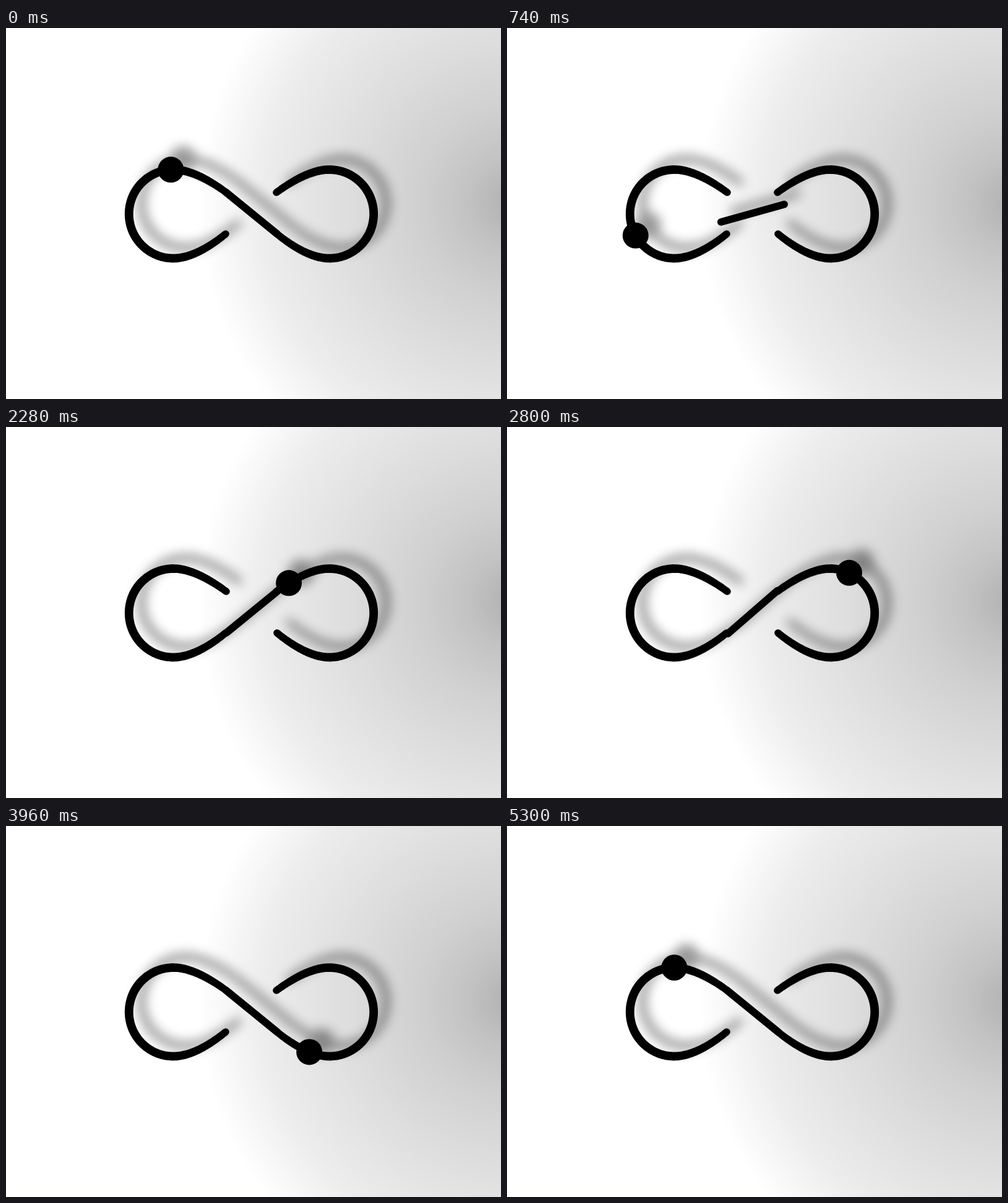
An HTML page for the animation above (5.32 s loop, 800 px wide and 600 px high).

```html
<!DOCTYPE html>
<html lang="en">
<head>
<meta charset="utf-8">
<title>Infinity switch</title>
<style>
  html, body { margin: 0; width: 100%; height: 100%; overflow: hidden; background: #fff; }
  svg { display: block; width: 100%; height: 100%; }
</style>
</head>
<body>
<svg viewBox="0 0 800 600">
  <defs>
    <radialGradient id="shade" gradientUnits="userSpaceOnUse" cx="820" cy="283" r="510">
      <stop offset="0" stop-color="#b0b0b0"/>
      <stop offset=".15" stop-color="#c3c3c3"/>
      <stop offset=".3" stop-color="#d0d0d0"/>
      <stop offset=".5" stop-color="#dcdcdc"/>
      <stop offset=".8" stop-color="#ededed"/>
      <stop offset="1" stop-color="#fff"/>
    </radialGradient>
    <filter id="shadow" filterUnits="userSpaceOnUse" x="0" y="0" width="800" height="600" color-interpolation-filters="sRGB">
      <feDropShadow dx="20" dy="-17" stdDeviation="9" flood-color="#000" flood-opacity=".4"/>
    </filter>
  </defs>
  <rect width="800" height="600" fill="url(#shade)"/>
  <g id="figure" filter="url(#shadow)">
    <line id="bar" x1="-53" x2="53" stroke="#000" stroke-width="12" stroke-linecap="round"/>
    <circle id="dot" r="21"/>
  </g>
</svg>
<script>
const LOOP = 5320, PHASE = 20, TURN = 1150, TILT = 39.2;
const figure = document.getElementById('figure');
const bar = document.getElementById('bar');
const dot = document.getElementById('dot');

function make(tag, attrs) {
  const el = document.createElementNS('http://www.w3.org/2000/svg', tag);
  for (const key in attrs) el.setAttribute(key, attrs[key]);
  return el;
}

const leftLoop = 'M356 266C330 247 298.5 229 270.5 229A71.75 71.75 0 0 0 270.5 372.5C298.5 372.5 330 353.5 355 333';
const rightLoop = 'M437 266C463 247 494.5 229 522.5 229A71.75 71.75 0 0 1 522.5 372.5C494.5 372.5 463 353.5 438 333';

const track = make('path', {
  d: 'M270.5 229A71.75 71.75 0 0 0 270.5 372.5C298.5 372.5 330 353.5 355 333L437 266' +
     rightLoop.slice(rightLoop.indexOf('C')) +
     'L356 266C330 247 298.5 229 270.5 229'
});
const trackLength = track.getTotalLength();

// A stroke that gets slightly thinner towards both ends.
function drawRibbon(d) {
  const line = make('path', { d });
  const length = line.getTotalLength(), steps = 160;
  const outer = [], inner = [];
  for (let i = 0; i <= steps; i++) {
    const s = length * i / steps;
    const p = line.getPointAtLength(s);
    const a = line.getPointAtLength(Math.max(0, s - 0.5));
    const b = line.getPointAtLength(Math.min(length, s + 0.5));
    const angle = Math.atan2(b.y - a.y, b.x - a.x);
    const half = 5.8 + 1.1 * Math.min(1, s / 95, (length - s) / 95);
    const nx = -Math.sin(angle) * half, ny = Math.cos(angle) * half;
    outer.push(`${p.x + nx} ${p.y + ny}`);
    inner.unshift(`${p.x - nx} ${p.y - ny}`);
    if (i % steps === 0) figure.insertBefore(make('circle', { cx: p.x, cy: p.y, r: half }), bar);
  }
  figure.insertBefore(make('path', { d: `M${outer.concat(inner).join('L')}Z` }), bar);
}

// Cubic Bezier timing with flat ends.
function ease(x) {
  if (x <= 0) return 0;
  if (x >= 1) return 1;
  let lo = 0, hi = 1, u = 0.5;
  for (let i = 0; i < 24; i++) {
    u = (lo + hi) / 2;
    const v = 1 - u;
    if (3 * v * v * u * 0.63 + 3 * v * u * u * 0.555 + u * u * u < x) lo = u;
    else hi = u;
  }
  return u * u * (3 - 2 * u);
}

function render(time) {
  const t = (time + PHASE) % LOOP;
  const p = track.getPointAtLength(trackLength * t / LOOP);
  dot.setAttribute('cx', p.x);
  dot.setAttribute('cy', p.y);
  const angle = TILT
    - 2 * TILT * ease(t / TURN)
    - (180 - 2 * TILT) * ease((t - LOOP / 2) / TURN);
  bar.setAttribute('transform', `translate(397 299.5) rotate(${angle})`);
}

drawRibbon(leftLoop);
drawRibbon(rightLoop);

const start = performance.now();
function tick() {
  render(performance.now() - start);
  requestAnimationFrame(tick);
}
render(0);
requestAnimationFrame(tick);
</script>
</body>
</html>
```
